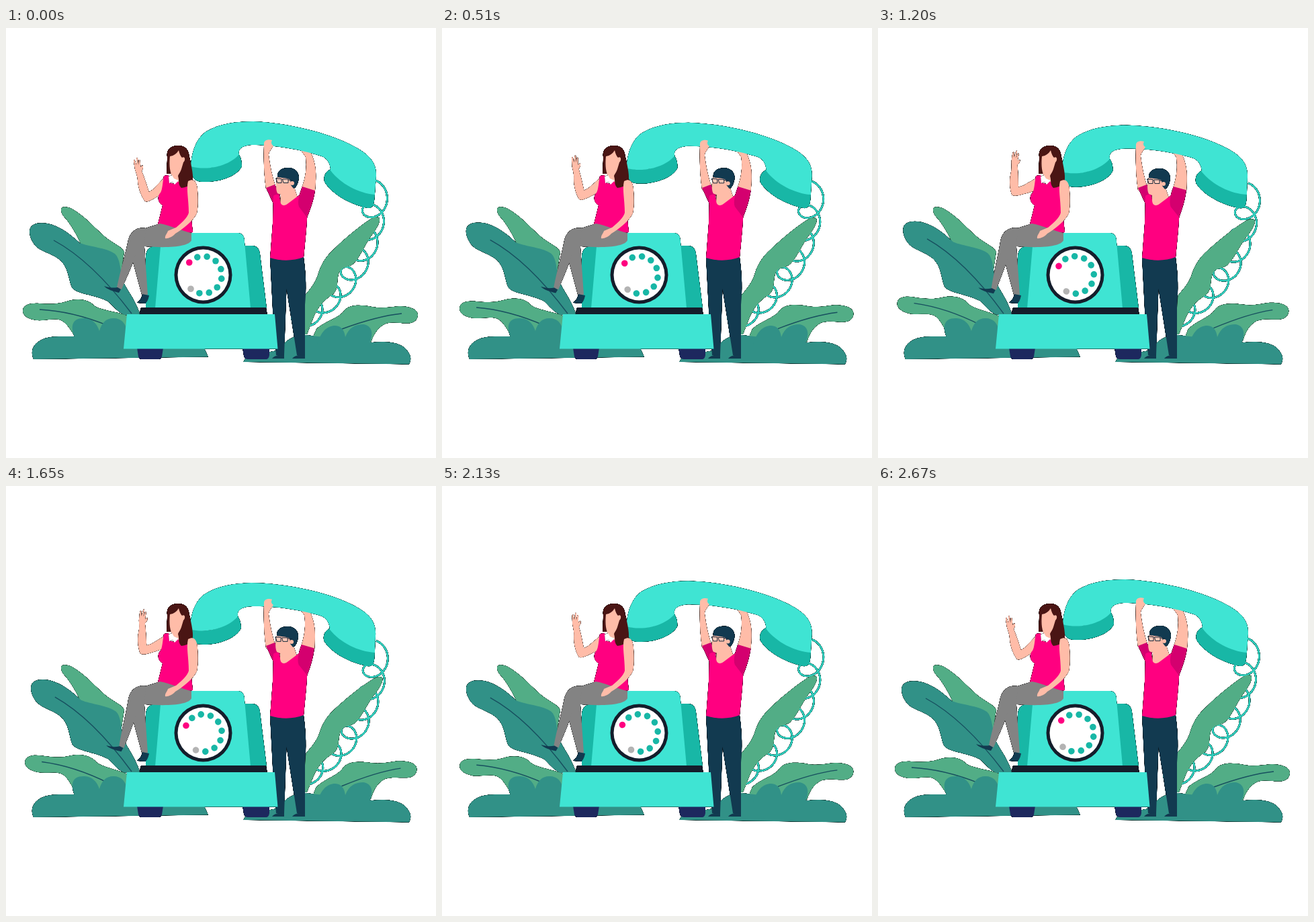
These frames come from a looping animation (640x640 px, 2.7 s). An HTML page:

```html
<!DOCTYPE html>
<html lang="en">
<head>
<meta charset="utf-8">
<title>Telephone</title>
<style>
html, body { margin: 0; width: 100%; height: 100%; overflow: hidden; background: #fff; }
svg { display: block; width: 100vw; height: 100vh; }
.light { fill: #3fe4d3; }
.teal { fill: #18b7a6; }
.leaf { fill: #52ad86; }
.bush { fill: #319187; }
.navy { fill: #123a50; }
.pink { fill: #ff0080; }
.rose { fill: #d4006f; }
.skin { fill: #ffbca8; }
.hair { fill: #4a1514; }
.grey { fill: #838383; }
.ink { fill: #141d2b; }
.foot { fill: #1d285e; }
.white { fill: #fff; }
.vein { fill: none; stroke: #174f5f; stroke-width: 1.4; }
</style>
</head>
<body>
<svg viewBox="0 0 640 640">
  <defs>
    <!-- thin dark rim along the soft outer edge -->
    <filter id="rim" filterUnits="userSpaceOnUse" x="0" y="0" width="640" height="640" color-interpolation-filters="sRGB">
      <feComponentTransfer in="SourceAlpha" result="hard"><feFuncA type="linear" slope="4" intercept="-0.4"/></feComponentTransfer>
      <feMerge><feMergeNode in="hard"/><feMergeNode in="SourceGraphic"/></feMerge>
    </filter>
  </defs>
  <g filter="url(#rim)">
    <path class="leaf" d="M82 271C81 265 90 265 98 269C118 280 132 298 150 313C162 322 172 325 176 333L170 372L150 360L113 325C106 309 99 297 90 285C84 279 82 275 82 271Z"/>
    <g id="bigLeaf">
      <path class="bush" d="M35 303C35 290 50 289 62 291C80 295 95 306 110 320C125 326 150 327 162 336C170 343 170 360 173 372C177 388 190 398 200 427H176C165 422 160 414 152 407C130 396 104 396 98 386C92 370 93 357 80 345C66 334 50 333 42 322C38 316 35 310 35 303Z"/>
      <path class="vein" d="M71 316C110 337 150 376 187 425"/>
    </g>
    <g id="lowLeaf">
      <path class="leaf" d="M25 421C25 411 38 409 50 410C65 411 78 411 90 407C105 402 122 403 131 413C140 420 165 422 180 428V470L103 459C97 452 92 440 82 435C72 431 60 436 45 435C32 433 25 428 25 421Z"/>
      <path class="vein" d="M50 419C90 421 125 432 152 443"/>
    </g>
    <path class="bush" d="M41 493C36 482 39 470 55 463C72 456 92 461 107 458L150 450L295 476L301 489.5Z"/>
    <path class="bush" d="M103 462C95 445 98 432 115 432C128 431 136 441 139 451C142 440 148 432 160 432C172 432 178 440 180 450V478H103Z"/>

    <path id="cord" fill="none" stroke="#30cfbe" stroke-width="2.8"/>
    <path id="tallLeaf" class="leaf" d="M555 282C559 286 552 298 547 305C535 320 527 342 517 351C510 357 499 354 495 366C492 378 495 388 487 396C475 404 466 412 458 430L448 456H442L445 398C452 389 460 380 464 368C468 354 474 343 484 333C500 317 522 298 540 286C546 282 551 280 555 282Z"/>
    <g id="sideLeaf">
      <path class="leaf" d="M613 427C613 418 600 414 585 414C572 415 560 418 545 415C525 411 510 412 503 421C495 432 475 436 462 448L455 464L543 468C548 455 553 446 565 440C580 436 590 441 603 439C610 437 613 432 613 427Z"/>
      <path class="vein" d="M589 425C560 428 530 437 500 448"/>
    </g>
    <path class="bush" d="M353 497L358 489L408 479C415 462 435 454 455 458L545 468C565 465 590 468 597 480C604 488 603 495 600 500.5Z"/>
    <path class="bush" d="M463 472C468 452 478 443 490 443C500 443 504 452 505 460C510 446 520 441 532 441C545 443 548 455 540 472Z"/>

    <path id="armR" class="skin" d="M439 182C446 181 453 183 455 188C461 203 463 215 460 243L440 238C446 222 448 207 446 192Z"/>
    <g id="handset">
      <path class="teal" d="M275 205C277 222 278 229 295 229C318 230 345 220 351 206C351 198 350 193 346 187C330 205 300 213 275 205Z"/>
      <path class="teal" d="M483 210C475 214 472 221 474 229C484 246 510 262 538 268C548 269 548 260 549 247C520 243 498 230 483 210Z"/>
      <path class="light" d="M275 206C276 185 283 164 298 154C318 142 344 139 368 139C420 141 478 156 512 173C538 186 552 198 551 220L549 248C525 246 498 232 483 212C483 202 478 194 470 191C445 183 410 175 370 174C352 174 345 180 347 188C336 202 305 214 275 206Z"/>
    </g>

    <path id="armL" class="skin" d="M384 172C384 167 390 165 396 167C394 170 395 174 398 175C395 181 391 184 391 189C393 205 396 220 401 235L387 240C384 220 383 195 384 172Z"/>
    <path class="rose" d="M387 238L400 233L408 249L400 266Z"/>
    <g id="head">
      <path class="skin" d="M404 221C410 219 420 220 427 224L430 240L434 252L418 266L408 264L409 248L404 246C402 242 402 238 402 232Z"/>
      <path class="navy" d="M404 222C403 212 411 208 420 208C431 208 436 215 436 223C435 231 432 238 428 239L424 234L423 226C417 222 410 224 404 222Z"/>
      <circle class="skin" cx="426" cy="231" r="3"/>
      <path d="M402 224L410 224.500V230.500H404ZM411.500 225L420 225V230.500H413ZM420 226L427 227" fill="#ffc9b8" stroke="#14283a" stroke-width="1"/>
    </g>
    <path class="pink" d="M398 250C404 245 408 249 408 257C409 266 415 265 420 261L436 249C446 245 450 255 449 270L447 300L443 342C428 348 408 347 393 343L397 290Z"/>
    <path id="sleeve" class="rose" d="M441 236L460 242C458 256 453 270 448 282L436 266C433 258 437 246 441 236Z"/>
    <path class="navy" d="M393 342C408 347 428 347 443 341C447 370 447 390 445 412V487H433L417.500 388L414 487H402L397 420Z"/>
    <path class="navy" d="M396 492C399 488 404 487 414 485V492ZM426 492C429 488 434 487 445 485V492Z"/>

    <path class="teal" d="M208 417V340C209 328 214 324 230 324H366C373 324 377 328 378 336L388 417Z"/>
    <path class="light" d="M222 417L230 325L240 305H345C352 305 355 310 355 318L364 417Z"/>
    <path class="foot" d="M195 476H234L232 489Q231 493 227 493H202Q198 493 197 489ZM352 476H392V487Q391 493 387 493H360Q355 493 354 488Z"/>
    <path class="ink" d="M201 416H387L389 427H198Z"/>
    <path class="light" d="M180 426H400L404.500 477.500H175Z"/>
    <circle class="ink" cx="293.500" cy="367.500" r="43"/>
    <circle class="white" cx="293.500" cy="367.500" r="38"/>
    <g id="dial"></g>

    <path id="wave" class="skin" d="M236 222L219 240L213 244C210 235 206 222 202 213C204 210 205 206 203 204L200.500 207L199.500 197Q198 194 197.500 198L197 204L196 194Q194 191 194 196V204L192 197Q190 194 190 199L192 211C194 217 196 222 196 228C197 240 202 252 207 258C211 260 218 256 237 243Z"/>
    <path class="hair" d="M240 192C238 180 247 175 256 175C268 175 272 182 273 192C276 205 280 222 277 230C274 236 266 238 261 238L254 222L247 217H239C239 208 240 200 240 192Z"/>
    <path class="skin" d="M244 191C250 190 254 187 257 182C258 187 260 191 262 193C266 190 268 196 264 200L261 210C260 214 257 217 256 220L258 230L250 232L247 220C243 212 243 200 244 191Z"/>
    <path class="pink" d="M235 220L242 219L243 230L250 232L256 228L262 237L270 227C276 228 272 240 273 255L278 304C265 307 240 300 226 292L233 264C225 259 225 250 230 245C233 240 233 230 235 220Z"/>
    <path class="white" d="M242 221L247 219L250 224L257 227L251 233L248 229L243 231Z"/>
    <path class="hair" d="M258 219H276C279 228 274 237 261 238C256 234 257 226 258 219Z"/>
    <path class="grey" d="M229 291C245 294 262 302 276 305V316C272 325 245 328 206 325L211 397H202L188 345L186 318C190 300 212 297 229 291Z"/>
    <g id="leg">
      <path class="grey" d="M208 298C195 296 186 302 182 315C178 335 170 362 165 386L172 389C181 368 190 350 193 335L206 322Z"/>
      <path class="navy" d="M146 384C154 387 160 387 166 386L171 389L168 394C160 392 150 389 146 384Z"/>
    </g>
    <path class="navy" d="M195 409C200 405 202 401 203 396L213 398C212 404 209 410 207 410Z"/>
    <path class="skin" d="M271 228C280 223 284 229 285 240C286 255 286 268 284 276C278 288 262 300 252 306C248 311 240 314 237 313C236 309 240 306 241 302L253 297C262 290 270 282 272 275C272 255 268 240 271 228Z"/>
  </g>
</svg>
<script>
const $ = id => document.getElementById(id);
const LOOP = 2700, DIAL_PEAK = 1920;

// Part, full swing in degrees, pivot
const swings = [
  ["bigLeaf", 1.1, 185, 425],
  ["lowLeaf", 5.1, 160, 456],
  ["tallLeaf", 1.7, 450, 450],
  ["sideLeaf", -2.7, 470, 460],
  ["handset", -1.8, 549, 250],
  ["armR", -1.6, 445, 275],
  ["sleeve", -2, 440, 275],
  ["wave", 17.3, 236, 227],
  ["leg", -2.7, 197, 308],
].map(([id, ...swing]) => [$(id), ...swing]);

function buildDial() {
  let dots = "";
  for (let i = 0; i < 10; i++) {
    const a = (221.7 + 30 * i) * Math.PI / 180;
    const color = i === 0 ? "#ff0080" : i === 9 ? "#b3b3b3" : "#18b7a6";
    dots += `<circle cx="${293.5 + 27.8 * Math.cos(a)}" cy="${367.5 + 27.8 * Math.sin(a)}" r="4.8" fill="${color}"/>`;
  }
  $("dial").innerHTML = dots;
}

// Coils wound along a quadratic curve
function buildCord() {
  const turns = 7.2, steps = 400, pts = [];
  const quad = (a, b, c, t) => (1 - t) ** 2 * a + 2 * t * (1 - t) * b + t * t * c;
  for (let i = 0; i <= steps; i++) {
    const t = i / steps, a = 2 * Math.PI * turns * t - Math.PI / 2, r = 18 - 4 * t;
    pts.push((quad(550, 546, 426, t) + r * Math.cos(a)).toFixed(1) + " " +
             (quad(245, 378, 443, t) + r * Math.sin(a)).toFixed(1));
  }
  $("cord").setAttribute("d", "M" + pts.join("L"));
}

const ease = p => (1 - Math.cos(Math.PI * p)) / 2;
const move = (el, value) => el.setAttribute("transform", value);

function draw(now) {
  const t = now % LOOP;
  const u = ease(t / (LOOP / 2));
  const d = t < DIAL_PEAK ? ease(t / DIAL_PEAK) : ease((LOOP - t) / (LOOP - DIAL_PEAK));
  for (const [el, deg, x, y] of swings) move(el, `rotate(${deg * u} ${x} ${y})`);
  move($("dial"), `rotate(${-19.4 * d} 293.5 367.5)`);
  move($("head"), `translate(${-u} ${u})`);
  move($("armL"), `translate(0 ${2 * u})`);
  move($("cord"), `translate(${u} ${450 * 0.018 * u}) scale(1 ${1 - 0.018 * u})`);
}

buildDial();
buildCord();
const start = performance.now();
function tick() {
  draw(performance.now() - start);
  requestAnimationFrame(tick);
}
tick();
</script>
</body>
</html>
```
